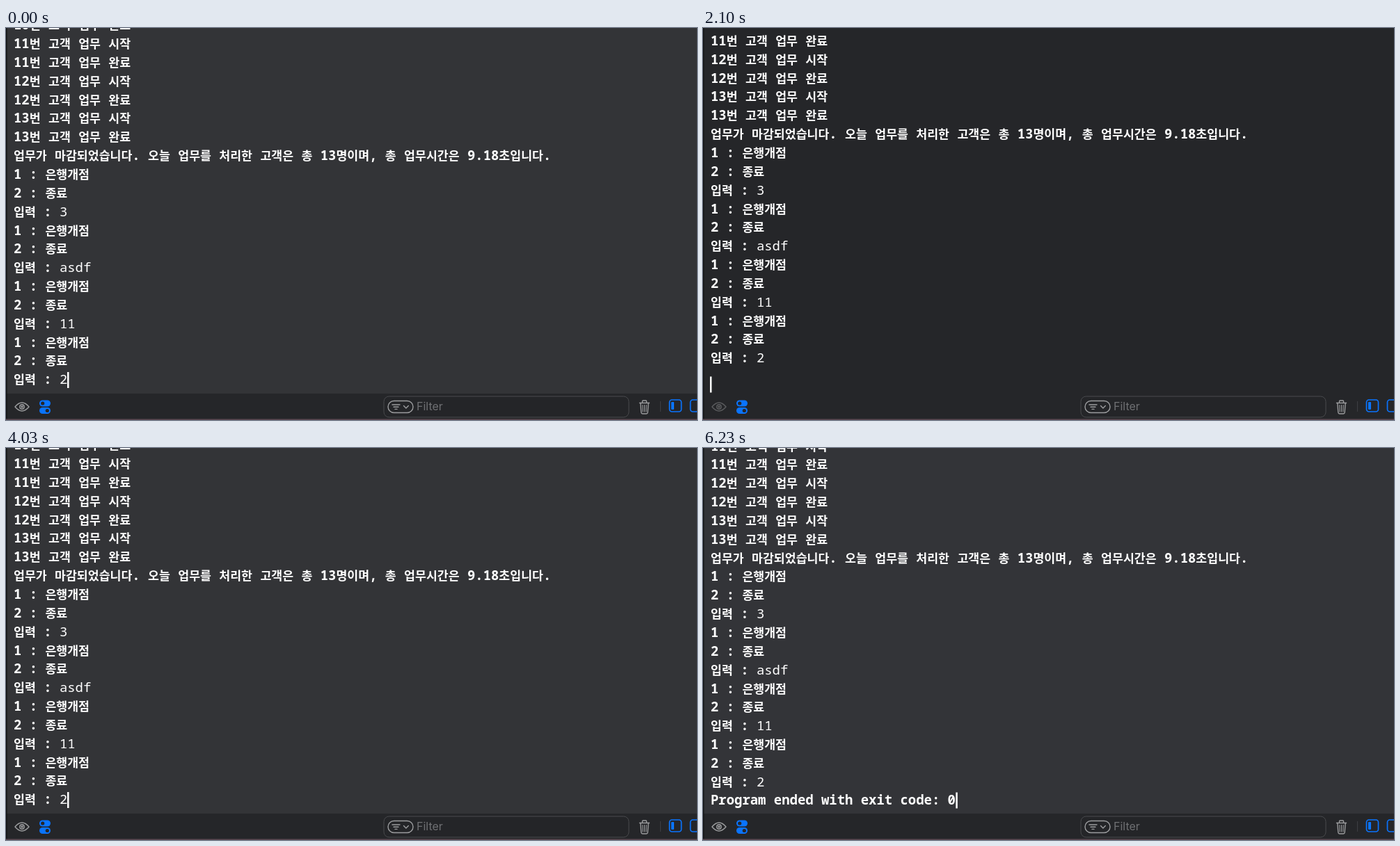
An HTML page that plays this animation: 993 by 564 pixels, repeating every 8 s.

```html
<!DOCTYPE html>
<html lang="ko">
<head>
<meta charset="utf-8">
<style>
  html, body { margin: 0; width: 100%; height: 100%; overflow: hidden; background: #252629; }
  svg { display: block; }
  .row { font: 700 18.93px "Noto Sans Mono", "DejaVu Sans Mono", monospace; fill: #fff; white-space: pre; }
  .ko { font: 700 17.3px "Noto Sans CJK KR", "Noto Sans CJK", sans-serif; }
  .typed { font-weight: 500; }
  .line { fill: none; stroke: #9c9d9f; stroke-width: 1.4; stroke-linecap: round; stroke-linejoin: round; }
  .blue { fill: #0a74ff; }
  .panel { fill: none; stroke: #0a74ff; stroke-width: 1.7; }
</style>
</head>
<body>
<svg width="993" height="564" viewBox="0 0 993 564">
  <rect width="993" height="564" fill="#252629"/>
  <rect id="console" width="993" height="526"/>
  <g id="log"></g>
  <rect id="caret" width="2.5" height="23" fill="#fff"/>

  <g id="eye" class="line">
    <path d="M13 545Q23 533 33 545Q23 557 13 545Z"/>
    <circle cx="23" cy="545" r="3.2"/>
    <circle cx="23" cy="545" r="1" fill="#9c9d9f"/>
  </g>
  <g class="blue">
    <rect x="48" y="535.5" width="16" height="9" rx="4.5"/>
    <rect x="48" y="546" width="16" height="9" rx="4.5"/>
    <g fill="#252629"><circle cx="52.7" cy="540" r="2.6"/><circle cx="59.3" cy="550.5" r="2.6"/></g>
  </g>

  <rect x="543" y="530" width="352" height="30" rx="7.5" fill="#242528" stroke="#4a4b4e"/>
  <g class="line">
    <rect x="549" y="536.5" width="36" height="17" rx="8.5"/>
    <path d="M555 542h11M557 545.2h7M559 548.4h3M571.5 543.5l3.4 3.4l3.4 -3.4"/>
  </g>
  <text x="590" y="550" font-family="Inter, sans-serif" font-size="16" fill="#6f7073">Filter</text>

  <g class="line">
    <path d="M910.5 539.5H924.5M914.5 539V537Q914.5 536 915.5 536H919.5Q920.5 536 920.5 537V539"/>
    <path d="M911.8 539.5L912.8 553Q913 555 914.8 555H920.2Q922 555 922.2 553L923.2 539.5"/>
    <path d="M917.5 542.5V552M914.8 542.5L915.1 552M920.2 542.5L919.9 552" stroke-width="1.1"/>
  </g>
  <path d="M940.5 537V552" stroke="#3e3f43"/>
  <rect class="panel" x="953.5" y="535" width="17" height="17" rx="3.5"/>
  <rect class="blue" x="956" y="538" width="4" height="11" rx="1"/>
  <rect class="panel" x="983.5" y="535" width="17" height="17" rx="3.5"/>

  <rect width="1.5" height="564" fill="#111214"/>
  <rect y="562.5" width="993" height="1.5" fill="#5a4651"/>
</svg>
<script>
const $ = id => document.getElementById(id);
const LOOP = 8000, PITCH = 26.85, BASELINE = 29;

// Hangul and Latin runs use their own font and size.
const runs = text => text.replace(/[가-힣]+/g, '<tspan class="ko">$&</tspan>');
const typed = text => `<tspan class="typed">${text}</tspan>`;

const rows = ['10번 고객 업무 완료'];
for (const n of [11, 12, 13]) rows.push(`${n}번 고객 업무 시작`, `${n}번 고객 업무 완료`);
rows.push('업무가 마감되었습니다. 오늘 업무를 처리한 고객은 총 13명이며, 총 업무시간은 9.18초입니다.');
for (const answer of ['3', 'asdf', '11', '2'])
  rows.push('1 : 은행개점', '2 : 종료', '입력 : ' + typed(answer));

const row = (text, y) => `<text class="row" x="11" y="${y}">${runs(text)}</text>`;
$('log').innerHTML = rows.map((text, i) => row(text, BASELINE + (i - 1) * PITCH)).join('')
  + `<g id="exit">${row('Program ended with exit code: 0', 538.5)}</g>`;

const waiting = { scroll: 0, caret: [88, 495], fill: '#333437', eye: 1 };
const entered = { scroll: -31, caret: [10, 501.5], fill: '#252629', eye: 0.45 };
const ended = { scroll: -25.5, caret: [363.3, 495.5], fill: '#333438', eye: 1, exit: true };

const stateAt = t => t >= 4130 ? ended : t >= 2100 && t < 2200 ? entered : waiting;

let shown;
function draw() {
  const state = stateAt(performance.now() % LOOP);
  if (state !== shown) {
    shown = state;
    $('console').setAttribute('fill', state.fill);
    $('log').setAttribute('transform', `translate(0 ${state.scroll})`);
    $('caret').setAttribute('transform', `translate(${state.caret})`);
    $('eye').setAttribute('opacity', state.eye);
    $('exit').setAttribute('visibility', state.exit ? 'visible' : 'hidden');
  }
  requestAnimationFrame(draw);
}
draw();
</script>
</body>
</html>
```
